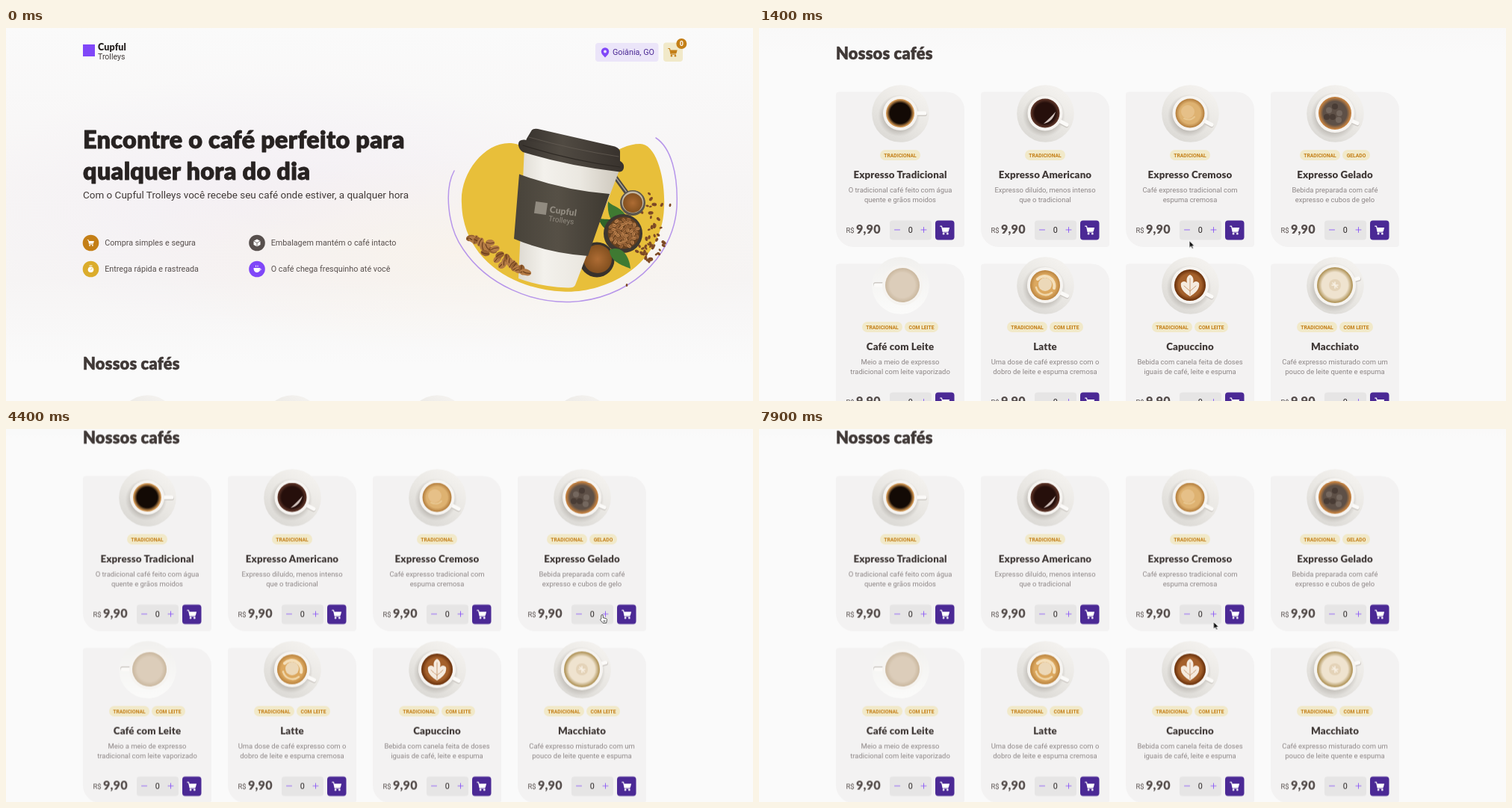
An HTML page for the animation above (8 s loop, 1000x499 px).

```html
<!DOCTYPE html>
<html lang="pt-BR">
<head>
<meta charset="utf-8">
<title>Cafés</title>
<style>
html, body { margin: 0; width: 100%; height: 100%; overflow: hidden; background: #fafafa; }
svg#stage { display: block; width: 100vw; height: 100vh; }
text { font-family: Roboto, sans-serif; white-space: pre; }
.display { font-family: Lato, sans-serif; font-weight: 900; letter-spacing: .01em; }
.heavy { stroke: currentColor; fill: currentColor; stroke-width: .025em; stroke-linejoin: round; }
.mid { text-anchor: middle; }
.button { fill: #4b2995; }

#page, #cursor, .arrow, .hand { animation: 8s steps(1) -20ms infinite; }
#page { animation-name: scroll; }
#cursor { animation-name: move; }
.arrow { animation-name: arrow; }
.hand { animation-name: hand; }
.hover1, .hover2, .hover3 { animation: hover1 8s linear -20ms infinite; }
.hover2 { animation-name: hover2; }
.hover3 { animation-name: hover3; }

@keyframes scroll {
  0%, 8.75% { transform: translateY(0); }
  10% { transform: translateY(-14px); }
  11.25% { transform: translateY(-60px); }
  12.5% { transform: translateY(-130px); animation-timing-function: steps(2); }
  15% { transform: translateY(-300px); }
  16.25% { transform: translateY(-370px); }
  17.5% { transform: translateY(-415px); }
  18.75%, 100% { transform: translateY(-437.5px); }
}
@keyframes move {
  0% { opacity: 0; transform: translate(537px, 474px); }
  2.5% { opacity: 1; transform: translate(537px, 474px); animation-timing-function: steps(2); }
  5% { transform: translate(622px, 242px); }
  6.25% { transform: translate(628px, 211px); }
  7.5% { transform: translate(616.5px, 237px); }
  12.5% { transform: translate(616.5px, 237px); animation-timing-function: steps(5); }
  18.75% { transform: translate(566px, 296.5px); }
  20% { transform: translate(562px, 303px); }
  21.25% { transform: translate(561px, 306px); animation-timing-function: steps(8); }
  31.25% { transform: translate(608px, 243px); }
  38.75% { transform: translate(608px, 243px); animation-timing-function: steps(3); }
  42.5% { transform: translate(621px, 243px); }
  43.75% { transform: translate(633px, 247px); }
  46.25% { transform: translate(633px, 247px); animation-timing-function: steps(3); }
  50% { transform: translate(702px, 246px); animation-timing-function: steps(4); }
  55% { transform: translate(798px, 248px); }
  58.75% { transform: translate(800px, 247px); }
  63.75% { transform: translate(800px, 247px); animation-timing-function: steps(3); }
  67.5% { transform: translate(831px, 248px); }
  71.25% { transform: translate(831px, 248px); animation-timing-function: steps(9); }
  82.5% { transform: translate(439px, 248px); animation-timing-function: steps(3); }
  86.25% { transform: translate(414px, 247px); }
  91.25% { transform: translate(414px, 247px); animation-timing-function: steps(2); }
  93.75% { transform: translate(440px, 248px); }
  95% { transform: translate(440px, 248px); animation-timing-function: steps(3); }
  98.75%, 100% { transform: translate(608.5px, 258px); }
}
@keyframes hand {
  0%, 40%, 47.5%, 72.5%, 96.25%, 100% { opacity: 0; }
  32.5%, 43.75%, 55%, 82.5% { opacity: 1; }
}
@keyframes arrow {
  0%, 40%, 47.5%, 72.5%, 96.25%, 100% { opacity: 1; }
  32.5%, 43.75%, 55%, 82.5% { opacity: 0; }
}
@keyframes hover1 {
  0%, 82.5%, 86.25%, 92.5%, 97.5%, 100% { fill: #4b2995; }
  84%, 93.75%, 95% { fill: #5d35b0; }
}
@keyframes hover2 {
  0%, 42.5%, 48.75%, 100% { fill: #4b2995; }
  45%, 46.25% { fill: #5d35b0; }
}
@keyframes hover3 {
  0%, 66.25%, 73.75%, 100% { fill: #4b2995; }
  68.75%, 71.25% { fill: #5d35b0; }
}
</style>
</head>
<body>
<svg id="stage" viewBox="0 0 1000 499" preserveAspectRatio="none">
  <defs>
    <linearGradient id="wash" x2="0" y2="1">
      <stop stop-color="#fafafa"/><stop offset=".45" stop-color="#f7f5f5"/><stop offset=".75" stop-color="#f6f4f4"/><stop offset="1" stop-color="#fafafa"/>
    </linearGradient>
    <radialGradient id="lilac"><stop stop-color="#f0e9f4" stop-opacity=".5"/><stop offset="1" stop-color="#f0e9f4" stop-opacity="0"/></radialGradient>
    <radialGradient id="cream"><stop stop-color="#faf3e6" stop-opacity=".6"/><stop offset="1" stop-color="#faf3e6" stop-opacity="0"/></radialGradient>
    <linearGradient id="paper"><stop stop-color="#dedad2"/><stop offset=".25" stop-color="#f3f1ec"/><stop offset=".6" stop-color="#ebe8e1"/><stop offset="1" stop-color="#cdc7bc"/></linearGradient>
    <linearGradient id="sleeve"><stop stop-color="#48433a"/><stop offset=".45" stop-color="#565046"/><stop offset="1" stop-color="#3e3931"/></linearGradient>
    <linearGradient id="lid"><stop stop-color="#38332e"/><stop offset=".4" stop-color="#504a42"/><stop offset="1" stop-color="#38322d"/></linearGradient>
    <radialGradient id="powder"><stop stop-color="#ae6c34"/><stop offset="1" stop-color="#83501f"/></radialGradient>
    <linearGradient id="saucer" x1=".75" y1=".1" x2=".25" y2=".95">
      <stop stop-color="#f3f1ee"/><stop offset=".5" stop-color="#e9e7e3"/><stop offset="1" stop-color="#dcdad6"/>
    </linearGradient>
    <linearGradient id="whiteSaucer" x2="0" y2="1"><stop stop-color="#f1f0ee"/><stop offset="1" stop-color="#fbfbfa"/></linearGradient>
    <radialGradient id="shade"><stop offset=".6" stop-color="#8d877f" stop-opacity=".55"/><stop offset="1" stop-color="#8d877f" stop-opacity="0"/></radialGradient>
    <symbol id="cart" viewBox="0 0 16 16">
      <path d="M.8 1.8h2.1l2 9h7.6" fill="none" stroke="currentColor" stroke-width="1.4" stroke-linecap="round" stroke-linejoin="round"/>
      <path d="M3.4 4H15l-1.5 5.6H4.6Z" fill="currentColor"/>
      <circle cx="5.8" cy="13.4" r="1.5" fill="currentColor"/><circle cx="11.8" cy="13.4" r="1.5" fill="currentColor"/>
    </symbol>
  </defs>

  <g id="page">
    <rect width="1000" height="970" fill="#fafafa"/>
    <rect width="1000" height="450" fill="url(#wash)"/>
    <ellipse cx="370" cy="230" rx="430" ry="170" fill="url(#lilac)"/>
    <ellipse cx="600" cy="300" rx="450" ry="130" fill="url(#cream)"/>

    <rect x="103" y="22" width="16" height="16" fill="#8047f8"/>
    <text class="display" x="123" y="30" font-size="12.5" fill="#272221">Cupful</text>
    <text x="123" y="42" font-size="10.5" fill="#403937">Trolleys</text>

    <rect x="789" y="20" width="84.5" height="25" rx="4" fill="#ebe5f9"/>
    <path d="M802 39.5c-3-3-5.2-5.3-5.2-8a5.2 5.2 0 0 1 10.4 0c0 2.7-2.2 5-5.2 8z" fill="#8047f8"/>
    <circle cx="802" cy="31.5" r="1.9" fill="#ebe5f9"/>
    <text x="812" y="36.3" font-size="10.78" fill="#4b2995">Goiânia, GO</text>
    <rect x="880" y="19.5" width="26" height="25.5" rx="4" fill="#f1e9c9"/>
    <use href="#cart" x="886" y="26" width="13.5" height="13.5" color="#c47f17"/>
    <circle cx="904.3" cy="21" r="7" fill="#c47f17"/>
    <text class="mid" x="904.3" y="24.3" font-size="9" font-weight="700" fill="#fff">0</text>

    <g font-size="32.3" color="#272221">
      <text class="display heavy" x="103" y="161">Encontre o café perfeito para</text>
      <text class="display heavy" x="103" y="203">qualquer hora do dia</text>
    </g>
    <text x="103" y="228" font-size="13.48" fill="#403937">Com o Cupful Trolleys você recebe seu café onde estiver, a qualquer hora</text>

    <g id="perks" font-size="10.78" fill="#574f4d"></g>
    <g id="hero"></g>

    <text class="display heavy" x="103" y="456.5" font-size="21.8" color="#403937">Nossos cafés</text>
    <g id="cards"></g>
  </g>

  <g id="cursor">
    <path class="arrow" d="M0 0V9.5L2.3 7.4 3.8 10.8 5.4 10.1 3.9 6.9H7Z" fill="#111" stroke="#fff" stroke-width=".8"/>
    <path class="hand" transform="translate(-3)" d="M3 .5c.9 0 1.3.6 1.3 1.3v2.8l4 .9c1 .3 1.3 1 1.1 2L8.7 11.5H4L.8 7.8c-.7-1 .4-1.9 1-1.4V1.8C1.800 1 2.2.5 3 .5zM5 8v2M6.6 8v2" fill="#fff" stroke="#2a2a2a" stroke-width=".8"/>
  </g>
</svg>

<script>
const $ = id => document.getElementById(id);
const dot = (x, y, r, fill) => `<circle cx="${x}" cy="${y}" r="${r}" fill="${fill}"/>`;
const shape = (d, fill, more = '') => `<path d="${d}" fill="${fill}" ${more}/>`;
const line = (d, color, width) => shape(d, 'none', `stroke="${color}" stroke-width="${width}" stroke-linecap="round"`);

let seed = 7;
const rand = () => (seed = (seed * 16807) % 2147483647) / 2147483647;
const bean = (x, y, r, tone) => `<g transform="translate(${x} ${y}) rotate(${rand() * 180})">
  <ellipse rx="${r}" ry="${r * .68}" fill="${tone}"/>${line(`M${-r * .8} 0Q0 ${r * .3} ${r * .8} 0`, '#5a3214', r * .15)}</g>`;

// Hero checklist
const perkIcons = {
  cart: '<use href="#cart" x="-5" y="-5" width="10" height="10" color="#fff"/>',
  box: shape('M0-5 4.5-2.6V2.6L0 5-4.5 2.6V-2.6Z', '#fff') + line('M-4.5-2.6 0 0 4.5-2.6M0 0V5', '#574f4d', .8),
  timer: dot(0, .7, 3.8, '#fff') + line('M-1.5-4.5h3', '#fff', 1.1) + line('M0 .7 1.6-.9', '#dbac2c', .9),
  mug: shape('M-4.5-1.5H4C4 2.5 2.5 4.500 0 4.5S-4.5 2.5-4.5-1.5Z', '#fff') + line('M4-.5q2 0 1 1.5T3 2.5M-1.5-4.5v1.2M1-4.5v1.2', '#fff', 1),
};
$('perks').innerHTML = [
  [113.5, 287.5, '#c47f17', 'cart', 'Compra simples e segura'],
  [336, 287.5, '#574f4d', 'box', 'Embalagem mantém o café intacto'],
  [113.5, 322.5, '#dbac2c', 'timer', 'Entrega rápida e rastreada'],
  [336, 322.5, '#8047f8', 'mug', 'O café chega fresquinho até você'],
].map(([x, y, color, icon, label]) => `<g transform="translate(${x} ${y})">${dot(0, 0, 10.8, color)}${perkIcons[icon]}
  <text x="18.7" y="3.7">${label}</text></g>`).join('');

// Hero picture
function heroArt() {
  let art = shape('M610 235C607 195 640 152 676 154C702 156 720 185 750 188C790 190 815 155 849 155C870 155 883 200 881 240C878 320 800 356 745 352.5C680 350 612 310 610 235Z', '#e8bf3a');
  art += line('M600 191C587 215 590 265 612 296C645 345 705 368 755 366.5C830 364 893 310 898 240C900 195 890 160 870 147', '#b796ea', 1.5);
  art += line('M816 200 832 222', '#4d4943', 6) + line('M817 201 831 220', '#a5a19a', 1.5);
  for (let i = 0; i < 46; i++) {
    const a = rand() * 2.2 - 1, d = 28 + rand() * 28;
    art += bean(832 + Math.cos(a) * d, 267 + Math.sin(a) * d, 1.8 + rand() * 1.7, '#85502a');
  }
  art += bean(889, 237, 2.2, '#85502a') + bean(831, 344, 2, '#85502a');
  art += shape('M836 264C828 238 812 240 806 232C804 252 812 262 822 268Z', '#3f7a32');
  art += shape('M826 262C806 252 800 258 793 254C797 268 808 276 820 272Z', '#2f6429');
  art += dot(839, 234, 17, '#5c554c') + dot(839, 233, 14.5, '#c3b7a3') + dot(839, 234, 13, 'url(#powder)');
  art += dot(791, 310, 23.5, '#38322c') + dot(792, 309, 19, 'url(#powder)');
  art += dot(826, 275, 26, '#3e3730') + dot(827, 274, 21.5, '#66401f');
  for (let i = 0; i < 48; i++) {
    const a = i * 2.4, d = Math.sqrt(i) * 2.85;
    art += bean(827 + Math.cos(a) * d, 274 + Math.sin(a) * d, 3.1, i % 2 ? '#bb814d' : '#9c673a');
  }
  art += shape('M808 297C822 290 834 302 836 322C820 316 808 310 808 297Z', '#3f7a32');
  art += shape('M694 160 822 188 762 344Q760 348 752 347.5Q715 346 686 335Z', 'url(#paper)');
  art += shape('M687 195.5Q745 217 808 222L779 305Q725 301 680 282Z', 'url(#sleeve)');
  art += shape('M697 148 703 138Q705 134 712 135L815 158.5Q822 161 822 166V184L694 156Z', 'url(#lid)');
  art += shape('M686 157Q685 149 694 149.5L820 177Q828 180 827 187Q826 194 818 192Q750 184 692 166Q687 163 686 157Z', 'url(#lid)');
  art += line('M692 157Q755 177 822 186', '#2d2823', 1.2) + line('M700 146Q760 163 820 172', '#645c53', .8);
  art += `<g transform="translate(716 241) rotate(8)" fill="#918b80">
    <rect x="-8" y="-8" width="16" height="16"/>
    <text class="display" x="12" y="4" font-size="12">Cupful</text><text x="12" y="15.5" font-size="10">Trolleys</text></g>`;
  for (let i = 0; i < 24; i++) {
    const k = i / 23;
    art += bean(622 + k * 75, 281 + k * 46 + (rand() - .5) * 22 * Math.sin(k * Math.PI), 6.2, i % 3 ? '#b37a45' : '#966031');
  }
  return art;
}
$('hero').innerHTML = heroArt();

// Drinks: name, tags, two text lines, liquid radius, core, edge, handle angle
const trad = 'TRADICIONAL', milk = 'COM LEITE';
const drinks = [
  ['Expresso Tradicional', [trad], 'O tradicional café feito com água', 'quente e grãos moidos', 19, '#130a05', '#cf9450', 0],
  ['Expresso Americano', [trad], 'Expresso diluído, menos intenso', 'que o tradicional', 19.5, '#260f0b', '#5a3226', 28],
  ['Expresso Cremoso', [trad], 'Café expresso tradicional com', 'espuma cremosa', 19.5, '#deb271', '#b98443', 28],
  ['Expresso Gelado', [trad, 'GELADO'], 'Bebida preparada com café', 'expresso e cubos de gelo', 22, '#5e5047', '#c28040', 24],
  ['Café com Leite', [trad, milk], 'Meio a meio de expresso', 'tradicional com leite vaporizado', 23, '#dccdba', '#cdbba3', 180],
  ['Latte', [trad, milk], 'Uma dose de café expresso com o', 'dobro de leite e espuma cremosa', 20, '#dca85f', '#c08a45', 26],
  ['Capuccino', [trad, milk], 'Bebida com canela feita de doses', 'iguais de café, leite e espuma', 21, '#a4602b', '#70360f', 28],
  ['Macchiato', [trad, milk], 'Café expresso misturado com um', 'pouco de leite quente e espuma', 24, '#efe3cf', '#b59a62', -16],
];
const toppings = {
  1: shape('M-2 14Q10 12 14-2Q8 5-2 14Z', '#cfc0bb'),
  2: dot(-3, -2, 9, '#e6c088') + line('M-8 7q8 4 14-2', '#e8c68f', 2),
  3: [[-8, -4], [0, -9], [6, 0], [-3, 5], [5, 9], [-11, 5]].map(([x, y], i) => dot(x, y, 4, i % 2 ? '#493c35' : '#74675e')).join(''),
  5: line('M-10-8A13 13 0 0 1 12 4', '#f4dfba', 4) + dot(0, -1, 9, '#ecd8b8') + line('M-12 3A13 13 0 0 0 9 10', '#f0d6a9', 2.5),
  6: shape('M0 15Q-14 7-12-3Q-8-7-4-3Q-6-11 0-14Q6-11 4-3Q8-7 12-3Q14 7 0 15Z', '#f5ebdf') + line('M0 13V-9M0 8-8 1M0 8 8 1', '#c79469', .9),
  7: dot(0, 0, 8, '#e4d3b8') + line('M-4 0 4 0M0-4 0 4M-3-3 3 3', '#f7efe2', 1.6),
};

function cup(i, r, core, edge, angle) {
  const pale = i === 4, grip = pale ? 36 : 33;
  return `<radialGradient id="drink${i}"><stop offset=".72" stop-color="${core}"/><stop offset=".95" stop-color="${edge}"/></radialGradient>
    ${dot(86.5, 29, 38.3, pale ? 'url(#whiteSaucer)' : 'url(#saucer)')}
    <g transform="translate(${pale ? 89 : 86} 28.5)">
      ${pale ? '' : dot(-1.5, 3, r + 9, 'url(#shade)')}
      <g transform="rotate(${angle})">${line(`M${r} 1H${grip}`, '#cdc9c4', 6)}${line(`M${r} 0H${grip}`, '#fbfaf8', 5)}</g>
      ${dot(0, 0, r + 4, '#f6f4f1')}${dot(0, 0, r, `url(#drink${i})`)}${toppings[i] || ''}
    </g>`;
}

const tagWidth = { [trad]: 54, [milk]: 45, GELADO: 37 };
function tagRow(tags) {
  const total = tags.reduce((sum, tag) => sum + tagWidth[tag], 3 * (tags.length - 1));
  let x = 86 - total / 2;
  return tags.map(tag => {
    const w = tagWidth[tag], left = x;
    x += w + 3;
    return `<rect x="${left}" y="77.5" width="${w}" height="14" rx="7" fill="#f1e9c9"/>
      <text class="mid" x="${left + w / 2}" y="87" font-size="6.74" font-weight="700" fill="#c47f17">${tag}</text>`;
  }).join('');
}

$('cards').innerHTML = drinks.map(([name, tags, top, bottom, r, core, edge, angle], i) => `
  <g transform="translate(${103 + 194 * (i % 4)} ${500.5 + 230 * (i >> 2)})">
    ${shape('M4 0H148A24 24 0 0 1 172 24V203.5A4 4 0 0 1 168 207.5H24A24 24 0 0 1 0 183.5V4A4 4 0 0 1 4 0Z', '#f3f2f2')}
    ${cup(i, r, core, edge, angle)}${tagRow(tags)}
    <text class="display mid" x="86" y="115" font-size="13.3" fill="#403937">${name}</text>
    <g font-size="9.43" fill="#8d8686"><text class="mid" x="86" y="134.5">${top}</text><text class="mid" x="86" y="147">${bottom}</text></g>
    <text x="13.5" y="188.5" font-size="9.43" fill="#574f4d">R$</text>
    <text class="display" x="27" y="189.5" font-size="16.2" fill="#574f4d">9,90</text>
    <rect x="72" y="172" width="56" height="26" rx="4" fill="#e6e5e5"/>
    ${line('M78.5 184.5H85.5M114 184.5H121M117.5 181V188', '#8047f8', .8)}
    <text id="count${i}" class="mid" x="99.7" y="188.3" font-size="10.78" fill="#272221">0</text>
    <rect class="button hover${i}" x="133" y="172" width="25.5" height="26" rx="4"/>
    <use href="#cart" x="139" y="178" width="14" height="14" color="#fff"/>
  </g>`).join('');

// Quantity per card: [time, value]
const clicks = {
  1: [[7200, 1], [7300, 2], [7600, 0]],
  2: [[2800, 1], [3000, 2], [3600, 0]],
  3: [[4900, 1], [5000, 2], [5500, 0]],
};
const start = performance.now() - 20;
function tick() {
  const t = (performance.now() - start) % 8000;
  for (const card in clicks) {
    const past = clicks[card].filter(([time]) => time <= t);
    $('count' + card).textContent = past.length ? past[past.length - 1][1] : 0;
  }
  requestAnimationFrame(tick);
}
tick();
</script>
</body>
</html>
```
